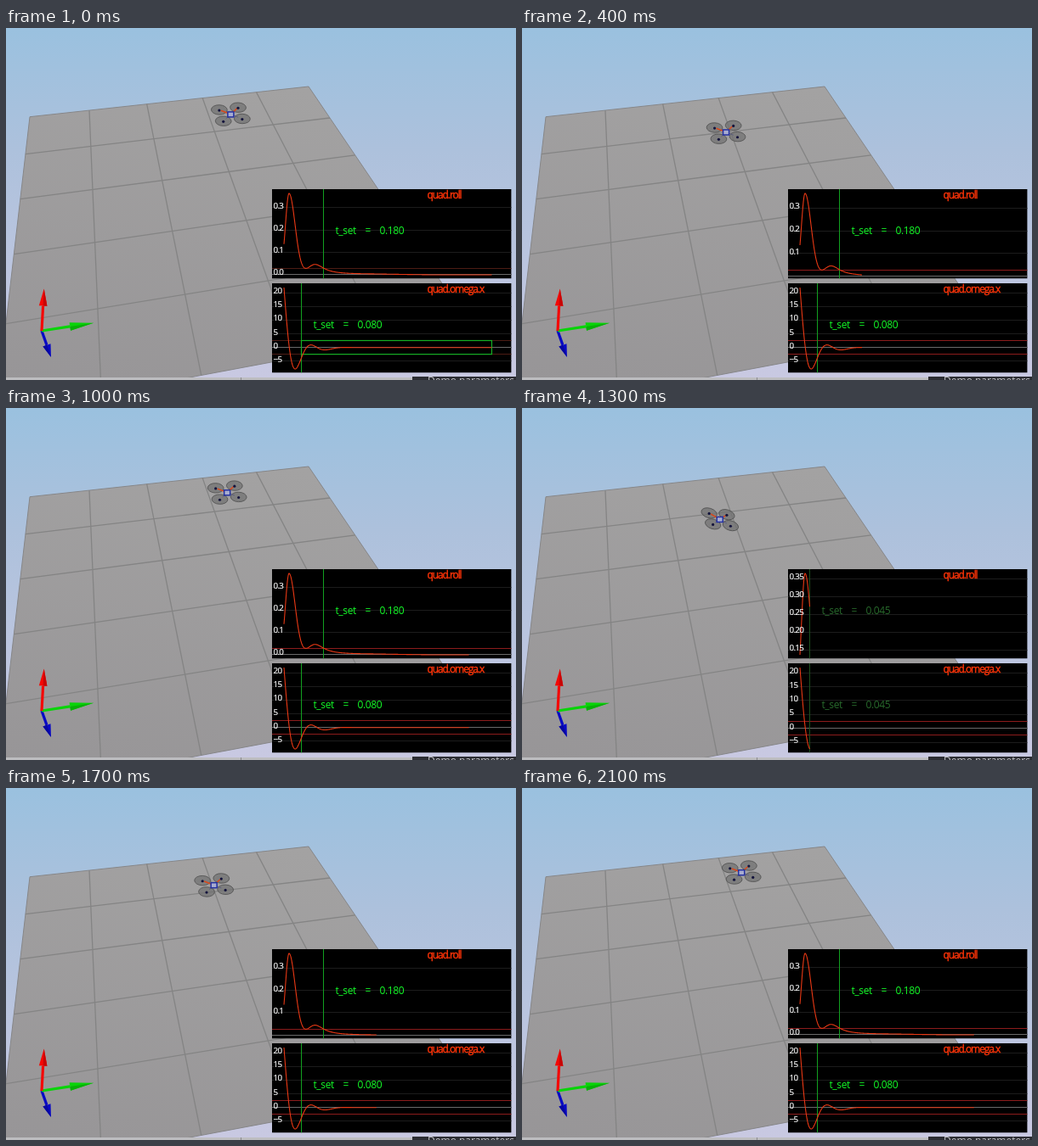
These frames come from a looping animation (600x415 px, 2200 ms). An HTML page:

```html
<!DOCTYPE html>
<html lang="en">
<head>
<meta charset="utf-8">
<title>Quadcopter settling</title>
<style>
  html, body { margin: 0; width: 100%; height: 100%; overflow: hidden; }
  svg { display: block; width: 600px; height: 415px; }
  text { font-family: "Open Sans", "Noto Sans", sans-serif; }
  .title { font-size: 12px; letter-spacing: -1.1px; fill: #ff3408; stroke: #ff3408; stroke-width: .4; }
  .tick { font-size: 9.8px; letter-spacing: -.7px; fill: #fff; stroke: #fff; stroke-width: .2; }
  .settle { font-size: 12px; letter-spacing: -.4px; }
</style>
</head>
<body>
<svg viewBox="0 0 600 415">
  <defs>
    <linearGradient id="sky" x2="0" y2="1">
      <stop stop-color="#9ac1df"/><stop offset=".35" stop-color="#adc1dc"/>
      <stop offset="1" stop-color="#c9c9e2"/>
    </linearGradient>
    <linearGradient id="ground" x1=".6" x2=".3" y2="1">
      <stop stop-color="#a3a2a2"/><stop offset="1" stop-color="#979597"/>
    </linearGradient>
    <clipPath id="clip0"><rect x="313" y="190" width="281.4" height="105.5"/></clipPath>
    <clipPath id="clip1"><rect x="313" y="301" width="281.4" height="105.5"/></clipPath>
  </defs>
  <rect width="600" height="415" fill="url(#sky)"/>
  <g id="floor"></g>
  <g id="axes"></g>
  <g id="drone"></g>
  <rect y="412" width="600" height="3" fill="#bdbdc0"/>
  <path d="M276.5 412v3" stroke="#8a8a8e"/>
  <rect x="478" y="411" width="122" height="4" fill="#2c2d33"/>
  <text x="496" y="419.5" font-size="12" fill="#c4c4c8">Demo parameters</text>
  <g id="plot0" clip-path="url(#clip0)"></g>
  <g id="plot1" clip-path="url(#clip1)"></g>
</svg>
<script>
const $ = id => document.getElementById(id);
const STEP_MS = 100, STEPS = 22, SIM_STEP = 0.0945, SIM_END = 0.955;
const ORIGIN = 327, SCALE = 256; // plot x of t = 0, pixels per second
const PLOT_HEIGHT = 105.5;

const line = (x1, y1, x2, y2, color, width = 1) =>
  `<path d="M${x1} ${y1}L${x2} ${y2}" stroke="${color}" stroke-width="${width}" fill="none"/>`;
const polygon = (points, fill, extra = "") =>
  `<polygon points="${points.join(" ")}" fill="${fill}" ${extra}/>`;
const crisp = v => Math.floor(v) + .5;
const clamp01 = v => Math.min(1, Math.max(0, v));
const gauss = d => Math.exp(-d * d);

// Responses as functions of the horizontal plot offset in pixels
function roll(x) {
  const swing = .365 * gauss((x - 6) / (x < 6 ? 6.04 : 10.1));
  const rebound = .0445 * (x < 36.5 ? gauss((x - 36.5) / 11.5) : 1 / (1 + ((x - 36.5) / 13) ** 2));
  return swing + rebound - .0028 * clamp01((x - 110) / 60);
}
const omega = x =>
  25.95 * Math.exp(-x / 12.15) * Math.cos(.566 + .1595 * x) - .9 * gauss((x - 41) / 13);

const droneX = x => 231.5 + .11 * x + .0001 * x * x;
const droneY = x => 115.5 + 16 * Math.cos(Math.PI * x / 209);

const plots = [
  { id: "plot0", title: "quad.roll", top: 190, value: roll, settle: .18, band: .027 },
  { id: "plot1", title: "quad.omega.x", top: 301, value: omega, settle: .08, band: 2.5, boxed: true },
];

// Square floor seen in perspective; each corner is x, y and its projective weight
function drawFloor() {
  const corners = [[28, 104.7, 1], [356, 69, 1.085], [546, 350, .6585], [-12.4, 455, .5735]];
  const at = (u, v) => {
    const mix = [(1 - u) * (1 - v), u * (1 - v), u * v, (1 - u) * v];
    let x = 0, y = 0, sum = 0;
    corners.forEach(([cx, cy, weight], i) => {
      const m = mix[i] * weight;
      x += m * cx; y += m * cy; sum += m;
    });
    return [x / sum, y / sum];
  };
  let out = polygon(corners.map(c => c.slice(0, 2)), "url(#ground)", 'stroke="#868688"');
  for (let k = .2; k < .9; k += .2) {
    out += line(...at(k, 0), ...at(k, 1), "#848484", 1.3);
    out += line(...at(0, k), ...at(1, k), "#848484", 1.3);
  }
  $("floor").innerHTML = out;
}

function drawAxes() {
  const arrow = (tipX, tipY, coneLength, color, shade) => {
    const dx = tipX - 42, dy = tipY - 357, size = Math.hypot(dx, dy);
    const [ux, uy] = [dx / size, dy / size];
    const neck = [tipX - ux * coneLength, tipY - uy * coneLength];
    const side = s => [neck[0] - uy * s, neck[1] + ux * s];
    return line(42, 357, ...neck, color, 3.2) +
      polygon([[tipX, tipY], side(4.8), side(-4.8)], color) +
      polygon([[tipX, tipY], neck, side(4.8)], shade);
  };
  $("axes").innerHTML =
    arrow(53, 388, 15, "#0808c4", "#0606a0") +
    arrow(103, 347.7, 28, "#08d408", "#08b008") +
    arrow(44.7, 307.5, 20, "#f40806", "#c80606");
}

function drawDrone(offset) {
  const tilt = roll(offset) / .31;
  const long = [13.5 - tilt, 5.3 + 2.4 * tilt], short = [8.65 - .6 * tilt, -8 + 2.8 * tilt];
  const rotors = [long, short].flatMap(([x, y]) => [[x, y], [-x, -y]]);
  const disc = ([x, y]) =>
    `<ellipse rx="9.4" ry="5.7" transform="translate(${x} ${y}) rotate(${2 + 17 * tilt})"
      fill="#707070" fill-opacity=".72" stroke="#565656" stroke-width=".9"/>`;
  const arm = ([x, y]) => y < 0
    ? line(0, 0, x * .85, y * .85, "#d8481c", 1.5)
    : line(0, 0, x * .65, y * .65, "#5c5e7c", 1);
  const hub = ([x, y]) => `<circle cx="${x}" cy="${y + .6}" r="1.6" fill="#14143c"/>`;
  $("drone").setAttribute("transform", `translate(${droneX(offset)} ${droneY(offset)})`);
  $("drone").innerHTML = [disc, arm, hub].map(part => rotors.map(part).join("")).join("") +
    `<rect x="-3.5" y="-2.8" width="7" height="6" fill="#a8acd0" stroke="#2430a0" stroke-width="1.5"/>`;
}

// Smallest 1-2-5 step that gives fewer than seven intervals
function tickStep(range) {
  for (let power = -4; ; power++)
    for (const m of [1, 2, 5]) {
      const step = m * 10 ** power;
      if (range / step < 7) return [step, Math.max(0, -power)];
    }
}

function drawPlot({ id, title, top, value, settle, band, boxed }, t) {
  const length = t * SCALE, samples = [];
  for (let x = 0; x < length; x += .5) samples.push([x, value(x)]);
  samples.push([length, value(length)]);
  const values = samples.map(s => s[1]);
  const low = Math.min(...values), high = Math.max(...values);
  const toY = v => top + 5 + (high - v) / (high - low) * 96;
  const across = (v, color) => line(313, crisp(toY(v)), 595, crisp(toY(v)), color);

  let out = `<rect x="313" y="${top}" width="282" height="${PLOT_HEIGHT}" fill="#000"/>`;
  let labels = "";
  const [step, digits] = tickStep(high - low);
  for (let i = Math.ceil(low / step); i * step <= high; i++) {
    const v = i * step;
    out += across(v, "#1c1c1c");
    labels += `<text class="tick" x="314.5" y="${toY(v) + 1}">${v.toFixed(digits).replace("-", "−")}</text>`;
  }
  const done = t >= SIM_END;
  out += across(0, "#6a6a6a");
  for (const v of [band, -band]) out += across(v, done ? "#4c1c14" : "#8c1c1c");

  const settled = Math.min(t, settle);
  const [textColor, lineColor] = t - settle > .1 ? ["#14fc28", "#12a020"] : ["#286a2c", "#1c501e"];
  const x = crisp(ORIGIN + settled * SCALE);
  out += line(x, top, x, top + PLOT_HEIGHT, lineColor);
  if (done && boxed)
    out += `<rect x="${x}" y="${crisp(toY(band))}" width="${ORIGIN + length - x}"
      height="${toY(-band) - toY(band)}" fill="none" stroke="#14b024" stroke-width="1.2"/>`;

  const path = samples.map(([px, v]) => `${(ORIGIN + px).toFixed(1)},${toY(v).toFixed(2)}`);
  out += `<polyline points="${path.join(" ")}" fill="none" stroke="#e83814" stroke-width="1.1"/>`;
  const word = (dx, s) => `<tspan x="${x + dx}" y="${top + 53.3}">${s}</tspan>`;
  out += labels + `<text class="title" x="495.5" y="${top + 11.3}">${title}</text>
    <text class="settle" fill="${textColor}">${word(14, "t_set")}${word(49, "=")}${word(66, settled.toFixed(3))}</text>`;
  $(id).innerHTML = out;
}

// The simulation runs twice per loop, ending on a finished plot
function simTime(step) {
  if (step % 12 === 0) return SIM_END;
  const t = step < 12 ? (step - 1) * SIM_STEP : .045 + (step - 13) * SIM_STEP;
  return Math.max(.005, Math.round(t / .005) * .005);
}

let shown = -1;
const start = performance.now();
function render() {
  const step = Math.floor((performance.now() - start) / STEP_MS) % STEPS;
  if (step !== shown) {
    shown = step;
    const t = simTime(step);
    drawDrone(t * SCALE);
    plots.forEach(plot => drawPlot(plot, t));
  }
  requestAnimationFrame(render);
}

drawFloor();
drawAxes();
render();
</script>
</body>
</html>
```
